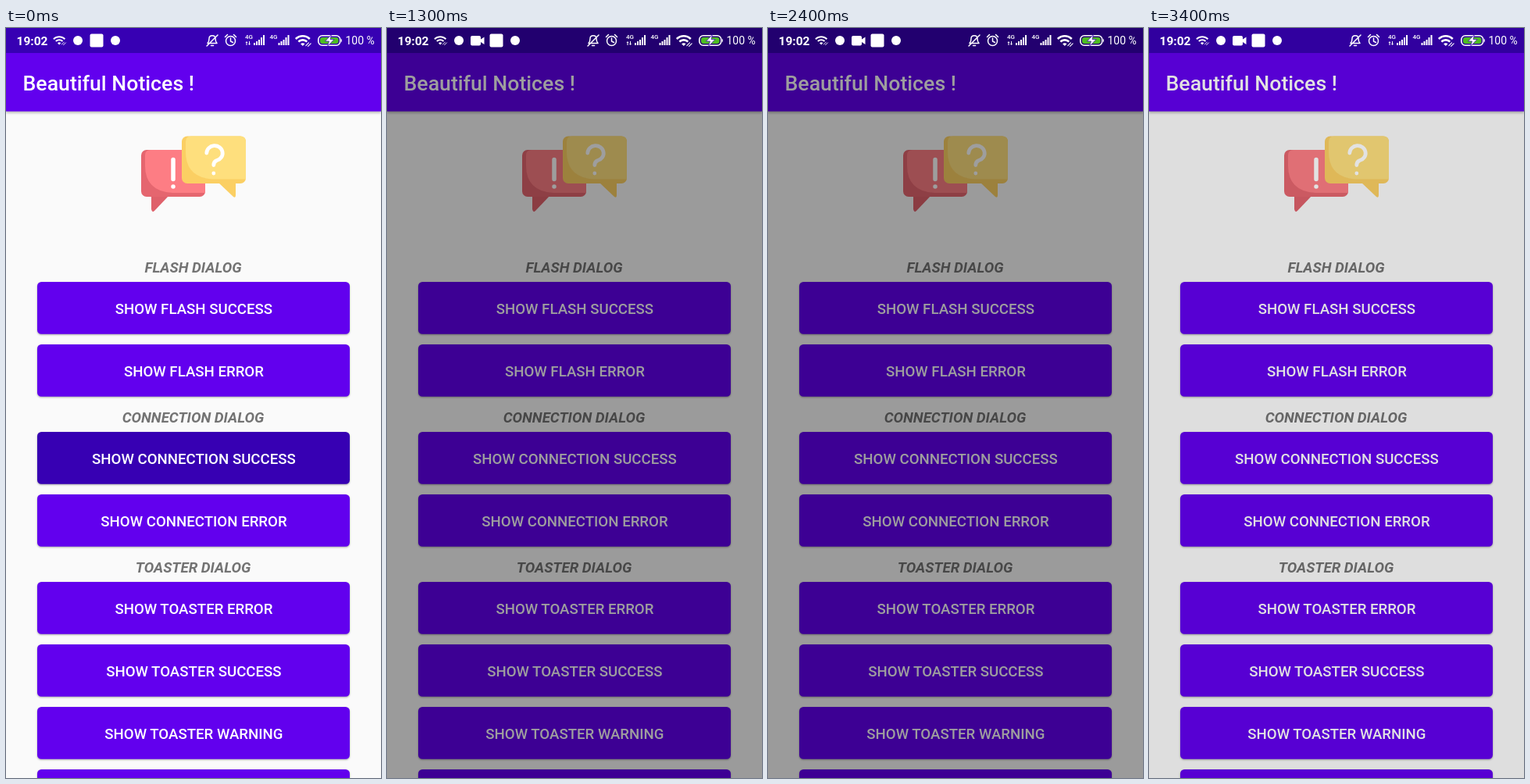
An HTML page that plays this animation: 480x960 px, repeating every 3.5 s.

```html
<!DOCTYPE html>
<html lang="en">
<head>
<meta charset="utf-8">
<title>Dialog demo</title>
<style>
  html, body { margin: 0; width: 100%; height: 100%; overflow: hidden; background: #fafafa; }
  svg { display: block; width: 100%; height: 100%; font-family: Roboto, sans-serif; }
  .bar { filter: drop-shadow(0 2px 1.5px #0004); }
  .button rect { fill: #6200ee; filter: drop-shadow(0 1.5px 1.2px #0005); }
  .button.raised rect { filter: drop-shadow(0 4px 2.5px #0004); }
  .button.pressed rect { fill: #3700b3; }
  .button text { fill: #fff; font-size: 18.67px; font-weight: 500; text-anchor: middle; }
  .heading { fill: #737373; font-size: 18.67px; font-weight: 700; font-style: italic; text-anchor: middle; }
  .line { fill: none; stroke: #fff; stroke-linecap: round; stroke-linejoin: round; }
  .centered { text-anchor: middle; }
</style>
</head>
<body>
<svg viewBox="0 0 480 960">
  <defs>
    <linearGradient id="green"><stop stop-color="#5bc72f"/><stop offset="1" stop-color="#a6ca29"/></linearGradient>
    <linearGradient id="pink"><stop stop-color="#eb1e5c"/><stop offset="1" stop-color="#f83f88"/></linearGradient>
    <path id="wifi" d="M1 9l2 2c4.97-4.97 13.03-4.97 18 0l2-2C16.93 2.93 7.08 2.93 1 9zm8 8l3 3 3-3c-1.65-1.66-4.34-1.66-6 0zm-4-4l2 2c2.76-2.76 7.24-2.76 10 0l2-2C15.14 9.14 8.87 9.14 5 13z"/>
    <path id="wifiOff" d="M23.64 7c-.45-.34-4.93-4-11.64-4-1.5 0-2.89.19-4.15.48L18.18 13.8 23.64 7zm-6.6 8.22L3.27 1.44 2 2.72l2.05 2.06C1.91 5.76.59 6.82.36 7L12 21.5l3.91-4.87 3.32 3.32 1.27-1.27-3.46-3.46z"/>
    <g id="wifiActive">
      <use href="#wifi"/>
      <path class="line" stroke-width="1.300" d="M16.500 19.500l4-4M19.500 20.500l4-4"/>
    </g>
    <g id="signal">
      <text x="0" y="14" font-size="8" font-weight="500">4G</text>
      <path d="M11 22v-3h2v3zm3 0v-5h2v5zm3 0v-7h2v7zm3 0v-10h2v10zm3 0v-13h2v13z"/>
    </g>
  </defs>

  <rect width="480" height="960" fill="#fafafa"/>
  <rect class="bar" width="480" height="106.700" fill="#6200ee"/>
  <rect width="480" height="32" fill="#3700b3"/>
  <text x="21.500" y="80" font-size="26.670" font-weight="500" fill="#fff">Beautiful Notices !</text>

  <!-- speech bubbles -->
  <path d="M186 214v18q1 5 4 2l19-20z" fill="#df616b"/>
  <rect x="173" y="156" width="82" height="60" rx="7" fill="#e5666f"/>
  <path d="M185 156h63q7 0 7 7v48h-42q-35-2-35-35v-13q0-7 7-7z" fill="#fd7d84"/>
  <path d="M272 198l19 18q3 2 3-2v-16z" fill="#fbcf63"/>
  <rect x="225" y="138.500" width="82" height="60.500" rx="7" fill="#fbcf63"/>
  <path d="M237 138.500h63q7 0 7 7v48h-42q-35-2-35-35v-13q0-7 7-7z" fill="#fedf7d"/>
  <path class="line" stroke-width="5.500" d="M214 168.500v25M214 203v.1"/>
  <path class="line" stroke-width="4.800" d="M256.800 160a10.200 9.600 0 1 1 13 9.500q-4 1.500-4 6M265.800 186v.1"/>

  <g id="content"></g>
  <rect id="dim" width="480" height="960" opacity="0"/>

  <g id="dialog">
    <rect x="12" y="72" width="456" height="166.500" fill="#fff"/>
    <rect class="accent" x="12" y="72" width="456" height="7"/>
    <rect class="accent" x="127" y="32" width="227" height="80" rx="40"/>
    <use id="symbol" fill="#fff"/>
    <text id="status" y="81.500" font-size="24" fill="#fff"></text>
    <text id="headline" class="centered" x="240" y="145" font-size="24" font-weight="700"></text>
    <text id="message" class="centered" x="240" y="171" font-size="18.670" fill="#757575"></text>
    <path class="line" d="M230 193.500l20 20m0-20l-20 20" style="stroke:#bdbdbd;stroke-linecap:butt" stroke-width="3"/>
  </g>

  <!-- status bar -->
  <g fill="#fff">
    <text x="13.500" y="22" font-size="15.500" font-weight="700">19:02</text>
    <use href="#wifiActive" transform="translate(59.500 7) scale(.72)"/>
    <circle cx="92" cy="16" r="6"/>
    <path id="camera" d="M109 10h9q2 0 2 2v2.500l4.500-3v9.500l-4.500-3v2.500q0 2-2 2h-9q-2 0-2-2v-8.500q0-2 2-2z"/>
    <g id="notices">
      <rect x="107.500" y="7.500" width="17" height="17" rx="2"/>
      <circle cx="140" cy="16" r="6"/>
    </g>
    <g class="line" stroke-width="1.500">
      <path d="M258 19.500h12c-2-2-2-4-2-6 0-5-8-5-8 0 0 2 0 4-2 6zM262.500 22.500h3M271 9l-14 14"/>
      <circle cx="287.500" cy="16.500" r="6"/>
      <path d="M287.500 13v4l3 1.500M280.500 11.500l3-3M294.500 11.500l-3-3"/>
    </g>
    <use href="#signal" x="306"/>
    <path d="M306.500 19l1.500-2 1.500 2zm3.500 1l1.500 2 1.500-2zM307.500 19h1v3h-1zm3.500-2h1v3h-1z"/>
    <use href="#signal" x="337.500"/>
    <use href="#wifiActive" transform="translate(369 5) scale(.9)"/>
    <rect x="399.800" y="9.800" width="28" height="12.400" rx="5" fill="none" stroke="#fff" stroke-width="1.600"/>
    <rect x="402" y="12" width="23.600" height="8" rx="3" fill="#4dbd22"/>
    <path d="M429 13.500q2 2.500 0 5z"/>
    <path d="M416.500 8.500l-8 8.500h5l-2 6.500 8.500-9h-5z" stroke="#3700b3" stroke-width=".7"/>
    <text x="434.500" y="21.300" font-size="14">100 %</text>
  </g>
</svg>
<script>
const LOOP = 3500, STEP = 100, SLIDE = 510, DIM = 0.6, STAGE_HEIGHT = 960;
const $ = id => document.getElementById(id);

const sections = [
  { y: 325, title: 'FLASH DIALOG', buttons: ['FLASH SUCCESS', 'FLASH ERROR'] },
  { y: 517, title: 'CONNECTION DIALOG', buttons: ['CONNECTION SUCCESS', 'CONNECTION ERROR'] },
  { y: 709, title: 'TOASTER DIALOG', buttons: ['TOASTER ERROR', 'TOASTER SUCCESS', 'TOASTER WARNING', 'TOASTER INFO'] }
];
$('content').innerHTML = sections.map(({ y, title, buttons }) =>
  `<text class="heading" x="239.5" y="${y - 12}">${title}</text>` +
  buttons.map((label, i) => `<g class="button" transform="translate(40 ${y + i * 80})">
    <rect width="400" height="66.7" rx="5.3"/><text x="200.4" y="41">SHOW ${label}</text></g>`).join('')
).join('');
const buttons = document.querySelectorAll('.button');

const rounds = [
  { press: 0, close: 1088, button: buttons[2], accent: 'green', color: '#5fc42e',
    icon: '#wifi', iconX: 162.7, iconY: 51.1, status: 'SUCCESS', statusX: 215.5,
    headline: 'CONNECTION FOUND', message: 'Connexion retablie avec succes' },
  { press: 1900, close: 3035, button: buttons[3], accent: 'pink', color: '#e91e5d',
    icon: '#wifiOff', iconX: 176.4, iconY: 51.6, status: 'ERROR', statusX: 229,
    headline: 'NO AVALAIBLE CONNECTION', message: "Un erreur s'est produite lors de la connexion" }
];

// Accelerate-decelerate progress of a slide that begins at `start`.
const slide = (t, start) => {
  const x = Math.min(1, Math.max(0, (t - start) / SLIDE));
  return (1 - Math.cos(Math.PI * x)) / 2;
};

function fillDialog(round) {
  document.querySelectorAll('.accent').forEach(el => el.setAttribute('fill', `url(#${round.accent})`));
  $('symbol').setAttribute('href', round.icon);
  $('symbol').setAttribute('transform', `translate(${round.iconX} ${round.iconY}) scale(1.667)`);
  $('status').setAttribute('x', round.statusX);
  $('headline').setAttribute('fill', round.color);
  for (const id of ['status', 'headline', 'message']) $(id).textContent = round[id];
}

let current;
function draw(t) {
  const round = rounds[t < rounds[1].press ? 0 : 1];
  if (round !== current) fillDialog(current = round);

  for (const { press, button } of rounds) {
    const age = t - press;
    button.classList.toggle('pressed', age >= 0 && age < 200);
    button.classList.toggle('raised', press > 0 && age >= 0 && age < 350);
  }
  const shown = slide(t, round.press + 200) - slide(t, round.close);
  $('dim').setAttribute('opacity', DIM * shown);
  $('dialog').setAttribute('transform', `translate(0 ${-STAGE_HEIGHT * (1 - shown)})`);

  const recording = t >= 100;
  $('camera').setAttribute('visibility', recording ? 'visible' : 'hidden');
  $('notices').setAttribute('transform', `translate(${recording ? 24 : 0} 0)`);
}

const begin = performance.now();
function tick() {
  const t = (performance.now() - begin) % LOOP;
  draw(Math.floor(t / STEP) * STEP);
  requestAnimationFrame(tick);
}
tick();
</script>
</body>
</html>
```
